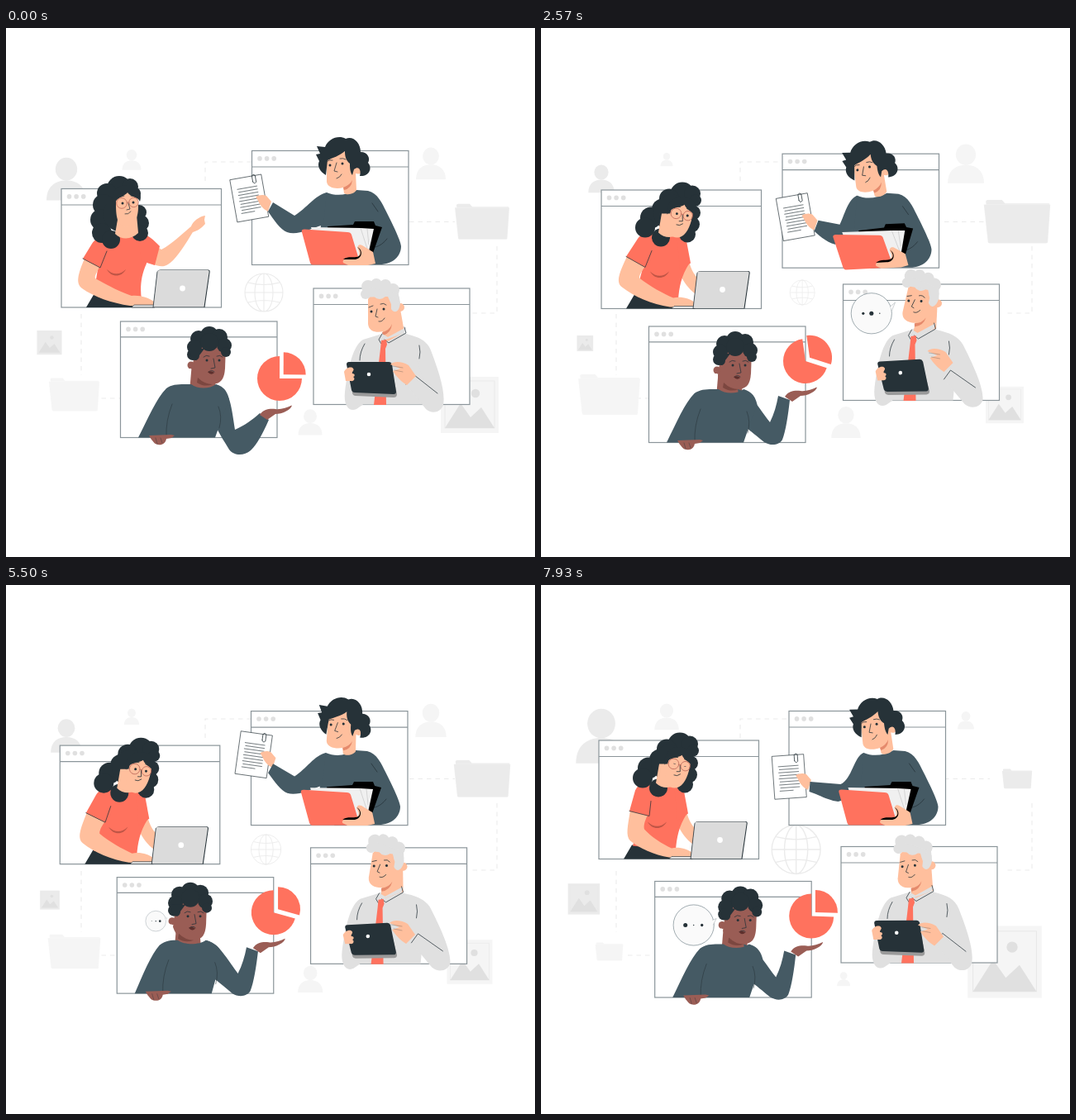
An HTML page that plays this animation: 640x640 px, repeating every 8 s.

```html
<!DOCTYPE html>
<html lang="en">
<head>
<meta charset="utf-8">
<title>Video meeting</title>
<style>
html,body{margin:0;width:100%;height:100%;overflow:hidden;background:#fff}
svg{display:block;width:100%;height:100%}
.line{fill:none;stroke:#263238;stroke-width:.75;stroke-linecap:round;stroke-linejoin:round}
.win{fill:#fff;stroke:#8b959a;stroke-width:1.2}
.dark{fill:#263238}.blue{fill:#455a64}.coral{fill:#ff725e}.skin{fill:#ffbf9d}.brown{fill:#9a5d55}
.grey{fill:#e0e0e0}.pale{fill:#f5f5f5}.mid{fill:#ebebeb}.thin{fill:none;stroke:#ebebeb;stroke-width:1.1}
</style>
</head>
<body>
<svg id="stage" viewBox="0 0 640 640"></svg>
<script>
const LOOP = 8000;
const T = [0, 1210, 2570, 3430, 4640, 6430, 7930];

// Monotone cubic interpolation through (times, values).
function track(values, times = T) {
  const n = values.length;
  const slope = i => (values[i + 1] - values[i]) / (times[i + 1] - times[i]);
  const tangent = i => {
    if (i === 0) return slope(0);
    if (i === n - 1) return slope(n - 2);
    const a = slope(i - 1), b = slope(i);
    return a * b <= 0 ? 0 : 2 * a * b / (a + b);
  };
  const m = values.map((_, i) => tangent(i));
  return t => {
    if (t <= times[0]) return values[0];
    if (t >= times[n - 1]) return values[n - 1];
    let i = 0;
    while (t > times[i + 1]) i++;
    const h = times[i + 1] - times[i], s = (t - times[i]) / h, r = 1 - s;
    return values[i] * (1 + 2 * s) * r * r + m[i] * h * s * r * r
      + values[i + 1] * s * s * (3 - 2 * s) - m[i + 1] * h * s * s * r;
  };
}

// Blends two paths of equal structure.
function mix(a, b, u) {
  const nums = b.match(/-?[\d.]+/g);
  let i = 0;
  return a.replace(/-?[\d.]+/g, v => (+v + (nums[i++] - v) * u).toFixed(2));
}

const path = (d, cls, extra = '') => `<path class="${cls}" d="${d}" ${extra}/>`;
const dot = (x, y, r, cls, extra = '') => `<circle class="${cls}" cx="${x}" cy="${y}" r="${r}" ${extra}/>`;
const slot = (id, cls) => `<path id="${id}" class="${cls}"/>`;
const group = (id, body) => `<g id="${id}">${body}</g>`;
const blobs = (list, cls) => list.map(([x, y, r]) => dot(x, y, r, cls)).join('');
const eyes = (id, ...pts) => group(id, blobs(pts.map(p => [...p, 1.5]), 'dark'));

const browser = (x, y, w, h, bar) =>
  `<rect class="win" x="${x}" y="${y}" width="${w}" height="${h}"/>` +
  path(`M${x} ${y + bar}h${w}`, 'win') +
  [0, 1, 2].map(i => dot(x + 9.5 + i * 8.6, y + 9.4, 2.8, 'grey')).join('');

const person = (size, cls) => `<g class="${cls}" transform="scale(${size})">
  <ellipse cy="-.47" rx=".55" ry=".58"/><path d="M-1 1.1C-1 .42-.58.1 0 .1S1 .42 1 1.1Z"/></g>`;
const folder = (size, cls) => `<g transform="scale(${size})">` +
  path('M-31-20Q-31-21.5-29-21.5H-15L-12-18H32V-10H-30Z', cls) +
  path('M-33-17H33L30.5 20Q30.5 21.5 29 21.5H-27Q-29 21.5-29 20Z', cls, 'stroke="#fff" stroke-opacity=".3" stroke-width=".6"') + '</g>';
const picture = (size, cls) => `<g transform="scale(${size})">
  <rect class="${cls}" x="-35" y="-34" width="70" height="68"/>
  <rect x="-30" y="-29" width="60" height="57" fill="none" stroke="#e6e6e6" stroke-width=".7"/>` +
  path('M-30 28L-11-2L1 15L14 3L30 28Z', 'grey') + dot(7, -14, 5.2, 'grey') + '</g>';
const globe = path('M-23 0A23 23 0 1 1 23 0A23 23 0 1 1-23 0ZM-11 0A11 23 0 1 1 11 0A11 23 0 1 1-11 0ZM0-23V23M-23 0H23M-19-12Q0-7 19-12M-19 12Q0 7 19 12', 'thin');

const bubble = (id, x, y, tail) => `<g id="${id}">` +
  dot(x, y, 24.6, '', 'fill="#fafafa" stroke="#455a64" stroke-width=".5"') +
  path(tail, '', 'fill="#fafafa" stroke="#8b959a" stroke-width=".4"') +
  [-1, 0, 1].map(i => dot(x + i * 10, y, 1, 'dark')).join('') + '</g>';

// Two or three poses for each flexible shape.
const pose = {
  torso: ['M130 249C142 256 152 254 160 248L172 252L170 285C163 300 162 315 164 328L106 322L112 286L108 258Z',
          'M134 245C146 252 156 250 162 245L168 250L173 284C164 298 161 312 160 328L108 322L118 286L113 252Z'],
  sleeveL: ['M132 249C118 250 108 254 104 261L93 279L114 290L122 270Z',
            'M134 245C120 245 114 248 110 255L97 275L120 288L128 268Z',
            'M134 245C120 245 115 247 111 255L104 280L128 286L130 268Z'],
  hem: ['M93 279L114 290L122 270', 'M97 275L120 288L128 268', 'M104 280L128 286L130 268'],
  armL: ['M95 279L113 289C110 296 107 299 108 303C124 312 140 320 152 324C162 323 172 326 179 331L178 336L150 336C128 333 106 325 92 315C84 309 87 298 95 279Z',
         'M98 275L120 287C115 294 113 297 113 301C126 311 142 320 154 325C164 323 174 326 181 331L180 336L150 336C128 333 106 323 92 312C84 306 89 294 98 275Z',
         'M105 279L126 285C122 293 121 298 122 302C130 311 144 320 155 325C164 323 174 326 181 331L180 336L152 336C134 333 116 325 105 316C99 310 102 298 105 279Z'],
  sleeveR: ['M158 248C172 249 178 256 186 264L180 287L164 282Z',
            'M158 247C166 247 168 250 170 256L175 283L162 291Z'],
  armR: ['M178 262L188 268C200 262 212 250 224 240C226 234 234 228 241 227L240 232L241 237C236 243 230 246 226 247C218 260 206 280 196 286C190 290 184 288 178 286Z',
         'M160 284L172 278C176 292 180 300 190 306C194 308 196 310 198 312L198 318L196 322C192 326 188 324 184 322C176 318 168 308 164 300C162 296 160 292 160 288Z'],
  reach: ['M388 199C374 202 364 218 349 227L323 211L317 222C324 232 332 244 340 247C352 251 366 244 384 238Z',
          'M388 199C377 203 373 222 367 234L341 229L336 242C344 249 352 256 361 258C368 258 374 252 384 244Z',
          'M388 199C376 203 374 231 360 237L323 234L322 246C334 250 346 257 357 258C366 256 374 250 384 242Z'],
  jumper: ['M224 431C232 437 246 437 254 431C264 434 268 440 270 450L262 470L253 495.5L160 495.5C172 472 182 448 194 436C202 430 212 431 224 431Z',
           'M212 431C220 437 238 437 246 431C256 434 262 438 266 448L260 470L253 495.5L160 495.5C170 472 180 448 190 437C198 431 204 431 212 431Z'],
  lift: ['M254 432C270 436 272 452 277 486C290 480 298 474 307 466L318 474C310 492 303 505 296 511C288 518 276 518 270 510C264 500 256 488 252 478Z',
         'M246 431C262 435 270 452 285 471C290 461 293 450 295 439L309 444C307 462 304 482 300 492C296 499 286 500 278 495C268 487 260 480 254 476Z'],
  shirtArm: ['M484 370C500 374 509 378 514 390C523 414 532 440 529 456C526 466 514 467 508 461L484 431L494 420L505 427L496 400Z',
             'M484 370C504 374 514 380 519 392C530 414 542 440 541 455C538 465 526 466 519 460L494 430L502 419L508 424L500 400Z']
};

// Hair curls: x, y upright, then x, y leaning, then radius.
const curls = [[137,194,165,200,15],[122,200,149,205,12],[150,192,177,199,10],[156,200,181,207,7],
  [118,214,141,218,13],[115,232,127,228,13],[116,248,120,240,12],[127,256,139,252,11],
  [161,223,178,222,9],[163,236,176,236,10],[162,248,171,248,10],[140,225,152,222,22]];

const woman = browser(67, 194.5, 193.5, 143.5, 19.5) +
  slot('armR', 'skin') + path('M107 321C120 322 140 328 158 331L152 338H97Z', 'dark') +
  slot('torso', 'coral') + slot('sleeveR', 'coral') +
  group('bust', path('M122 292C129 299 138 299 145 292C140 302 127 302 122 292Z', '', 'fill="#bf5546"')) +
  slot('armL', 'skin') + slot('sleeveL', 'coral') + slot('hem', 'line') +
  group('womanHair', curls.map(c => dot(c[0], c[1], c[4], 'dark')).join('')) +
  group('womanNeck', path('M136 226L132 249C140 257 152 256 160 248L158 226Z', 'skin')) +
  group('womanHead',
    path('M133 203C133 220 132 238 143 240C155 242 160 230 160 216L159 198L146 195Z', 'skin') +
    path('M130 216C132 205 143 204 147 199C151 205 160 204 162 210C166 199 157 189 146 190C130 190 125 205 130 216Z', 'dark') +
    '<g fill="none" stroke="#bd6b5c" stroke-width=".8"><circle cx="140" cy="212" r="6.3"/><circle cx="154.5" cy="211" r="5.7"/><path d="M146 211h3"/></g>' +
    eyes('womanEyes', [141, 212], [154, 211]) +
    path('M136 205L143 203M151 203L157 204M148 212L150 219L146 220M144 225Q148 226 151 222', 'line')) +
  path('M152 338L155 335H180V338Z', 'grey', 'stroke="#263238" stroke-width=".6"') +
  path('M187 292.5H245Q247 292.5 246.7 295L240.5 338H178L183 295Q183.5 292.5 187 292.5Z', 'dark') +
  path('M186 293H244Q246 293 245.7 295L239.5 337.5H178L183 295Q183.5 293 186 293Z', '', 'fill="#dbdbdb"') +
  path('M183 295L178 338', 'line') + dot(213.5, 315, 3.4, '', 'fill="#fff"');

const presenter = browser(297.5, 148.5, 189.5, 138, 19.5) +
  path('M388 199C400 204 412 202 424 196L438 197C450 200 455 212 460 222C468 238 477 256 478 264C478 276 468 286 452 286H410L380 250L384 202Z', 'blue') +
  path('M443 212L450 222M461 255Q455 263 447 265', 'line') +
  group('sheet',
    '<rect x="-19" y="-26" width="38.5" height="52" fill="#fff" stroke="#263238" stroke-width=".65"/>' +
    '<g opacity=".8">' + Array.from({ length: 9 }, (_, i) => path(`M${-12 + i % 2} ${-13 + i * 3.7}H${i === 8 ? 4 : 12}`, 'line')).join('') + '</g>' +
    path('M8-19V-26Q10-29 12-26V-18Q9-15 8-19', 'line')) +
  group('sheetHand', path('M8-2C12-4 17-5 21-3L27 4L23 16C17 13 13 8 11 3Z', 'skin')) +
  slot('reach', 'blue') +
  group('files',
    path('M389 240L420 238L422 234H445L447 239L455 241L443 275L434 286H398Z', '', 'fill="#000"') +
    path('M369 241L429 242L445 243L439 270L428 284H382Z', '', 'fill="#f0f0f0"') +
    path('M429 242L438 270M437 243L439 262', '', 'fill="none" stroke="#c8c8c8" stroke-width=".7"') +
    path('M361 243.5L413 247Q417 247 418 250L429 286.5H371Q369 286.5 368 284L358 247Q357 243.5 361 243.5Z', 'coral') +
    path('M408 284C406 280 412 278 421 278C427 277 429 274 426 268C424 264 427 261 431 263L444 271L447 285L438 287H414Z', 'skin') +
    path('M408 280C414 275 421 279 427 276C431 273 428 267 425 265C433 269 431 280 421 280Z', '', 'fill="#000"')) +
  group('manHead',
    path('M388 152L388 186C389 194 400 195 408 193L409 200C414 203 422 200 424 196L423 174L420 148Z', 'skin') +
    dot(426, 171, 5.5, 'skin') + path('M408 193Q416 190 419 184Q418 194 409 196Z', '', 'fill="#e58a6c"') +
    path('M389 160L387 178C380 174 376 167 379 161L375 153L380 152L376 143L386 144C390 134 402 129 411 134C420 130 429 139 429 150C438 150 441 158 438 163C444 170 439 180 428 179C430 172 427 166 421 171L419 178C416 174 416 168 416 164C411 160 410 155 410 149C403 155 395 157 389 160Z', 'dark') +
    eyes('manEyes', [392, 166], [407, 164]) +
    path('M389 161Q391 159 395 160M404 158Q408 157 411 159M400 163L397 173L401 174M400 182Q404 181 406 177', 'line'));

const speaker = browser(138.5, 355, 189.5, 140.5, 18.8) +
  group('speakerNeck', path('M225 405L222 440H254L252 415Z', 'brown')) +
  slot('lift', 'blue') + slot('jumper', 'blue') +
  path('M201 455Q193 475 194 495M257 458Q262 470 258 484', 'line', 'opacity=".7"') +
  path('M173 493L200 492L204 493L200 496L194 497C193 503 188 505 184 504C180 504 178 500 176 498Z', 'brown') +
  path('M181 496L183 503M187 496L189 502', 'line', 'opacity=".5"') +
  group('palm', path('M307 468C311 461 320 460 326 461C332 462 340 459 346 456.5C345 462 334 467 326 467L316 474Z', 'brown')) +
  slot('pie', 'coral') + slot('slice', 'coral') +
  group('speakerHead',
    path('M228 392L225 415C229 428 238 432 250 431C261 430 264 424 265 412L266 384L240 380Z', 'brown') +
    path('M232 423Q240 431 250 431Q240 435 231 429Z', '', 'fill="#7c4740"') +
    blobs([[246,372,11],[233,376,10],[258,374,10],[264,384,9],[266,392,6],[228,386,9],[226,395,7],[246,380,11]], 'dark') +
    path('M224 398C228 405 234 402 234 396L240 388H222Z', 'dark') + dot(224, 408, 4.5, 'brown') +
    dot(223, 413, 1.1, '', 'fill="#fff"') +
    eyes('speakerEyes', [243, 402], [258, 402]) +
    path('M239 398Q242 395 246 397M255 397Q259 395 262 398M251 400L253 411L248 412M245 416Q249 413 252 416', 'line') +
    path('M244 416Q248 421 252 417Q248 414 244 416Z', '', 'fill="#5c2f2c"')) +
  bubble('bubble2', 185.5, 408, 'M208 402L213 400L209 408');

const elder = browser(372, 315, 189, 140.5, 19.5) +
  path('M455 370L432 377C420 384 414 410 410 440C408 458 416 465 424 461L432 455.5H505L510 400L500 378L484 370L470 362Z', 'grey') +
  slot('shirtArm', 'grey') + slot('shirtCuff', 'line') +
  path('M434 382Q428 392 428 402M500 384Q502 392 500 400', 'line') +
  group('elderHead',
    path('M456 355L456 377L462 379L482 368L477 340Z', 'skin') +
    path('M438 328L438 358C439 368 449 369 457 367C468 364 477 350 476 338L470 322L444 320Z', 'skin') +
    dot(477, 338, 5, 'skin') + path('M455 368Q464 366 467 358Q466 369 456 372Z', '', 'fill="#e58a6c"') +
    path('M466 326L466 340C470 346 476 344 477 332L474 318Z', 'grey') +
    blobs([[438,313,8],[448,310,7],[459,311,7],[468,317,8],[435,322,6],[470,328,6],[452,319,9]], 'grey') +
    path('M433 326Q448 325 462 325L466 334L470 320L440 314Z', 'grey') +
    eyes('elderEyes', [442, 343], [457, 340]) +
    path('M439 338L444 336M453 334Q457 332 460 335M449 340L447 349L450 350M451 355Q455 356 458 351', 'line')) +
  path('M455 370L451 378L454 383L459 377L482 369L484 362L462 374Z', 'grey') +
  path('M482 362L484 369L463 381L458 377M455 370L451 377L454 382', 'line') +
  path('M454 378L460 377L461 383L459 388L460 456H445L453 388Z', 'coral') +
  group('tablet',
    path('M416 409H466L473 443Q473 447 469 447L423 445Q420 445 419 442Z', '', 'fill="#9a9a9a"') +
    path('M415 404H463Q466 404 467 407L472 440Q472 443 469 443L422 441Q419 441 418 438L412 407Q412 404 415 404Z', 'dark') +
    dot(439, 419, 2.3, '', 'fill="#fff"') +
    path('M409 416C411 411 418 409 420 412C422 414 418 416 419 418C423 418 422 422 420 422C423 424 421 428 417 427L411 427Z', 'skin')) +
  group('elderHand', path('M465 407C470 402 480 404 487 408L496 421L485 432C478 428 472 421 468 415L477 412Z', 'skin') +
    path('M467 409L480 411M470 414L480 416', 'line', 'opacity=".35"')) +
  bubble('bubble1', 406.3, 350.3, 'M429 342L435 337L431 347');

document.getElementById('stage').innerHTML =
  path('M241 185V162H297M488 234.5H543M594 264V345H562M91 346V420M105 448H138', 'thin', 'stroke-dasharray="5.5 5"') +
  group('shrink0', person(24, 'mid')) + group('shrink1', person(11.5, 'pale')) +
  group('shrink2', `<g transform="translate(-12 0)">${globe}</g>`) +
  group('shrink3', `<g transform="translate(-2.3 -2.6)">${picture(.43, 'mid')}</g>`) +
  group('shrink4', picture(1, 'pale')) +
  group('grow0', person(18, 'pale')) + group('grow1', `<g transform="translate(4.2 0)">${person(14.5, 'pale')}</g>`) +
  group('grow2', folder(1, 'mid')) + group('grow3', folder(.93, 'pale')) +
  group('woman', woman) + group('presenter', presenter) + group('speaker', speaker) + group('elder', elder);

const el = {};
document.querySelectorAll('[id]').forEach(node => el[node.id] = node);
const move = (id, value) => el[id].setAttribute('transform', value);
const draw = (id, d) => el[id].setAttribute('d', d);

const shrinkAt = [[73, 182], [152, 159], [324, 320], [54.8, 383.2], [561, 456]];
const growAt = [[514, 163.5], [363.8, 476.5], [576, 234.3], [82.5, 443.5]];
const shrink = track([1, .87, .655, .565, .61, 1.04, 1.28]);
const grow = track([1, 1.06, 1.22, 1.28, 1.22, .79, .55]);
const drift = {
  woman: [track([0, 3, 6, 3, -2, -1, 3]), track([0, 1, 1.5, 3, 2, -3.5, -6.5])],
  presenter: [track([0, -3, -5.5, -7, -4, 1.5, 2.5]), track([0, 1.5, 3.7, 5.5, 5.5, 2.5, 4])],
  speaker: [track([0, -3.7, -8, -8, -6.5, -2, -.8]), track([0, 4.5, 6, 3, -1.5, -1, 3.5])],
  elder: [track([0, -3, -6.5, -4, -2, -6, -9]), track([0, -3.5, -5, -2, 2.5, 3, 1.5])]
};
const lean = track([0, .92, 1, 1, 1, 1, 1]);
const tuck = track([0, 0, 0, 0, 0, .6, 1]);
const manTilt = track([0, -5, -7, -2, 6, 0, -6]);
const lower = track([0, .75, 1, 1, .2, 0, 0]);
const extend = track([0, 0, 0, 0, 0, 0, 1]);
const sheetX = track([294, 307, 313, 314, 306, 297, 297.5]);
const sheetY = track([206, 222.5, 225, 225, 202.5, 200.5, 228]);
const sheetTurn = track([-10, -12, -10, -10, 8, 8, -4]);
const headShift = track([0, 0, -3, -12, -18, -19, -4]);
const sway = track([0, 0, .1, 1, 1, 1, .2]);
const raise = track([0, .74, 1, 1, .96, 1, 1]);
const pieTurn = track([0, 275, 352, 360, 360, 360, 360]);
const pieSweep = track([90, 90, 116, 109, 109, 100, 92]);
const elderTilt = track([0, 13, 13, 10.5, 8, 11, 6]);
const elbow = track([0, .9, 1, 1, 1, .95, .1]);
const handX = track([0, 4, 9, 9, 3, 2, 0]);
const handY = track([0, -6, -11, -11, -2, 0, 3]);
const pop1 = track([0, 1, 1, 0], [500, 800, 5000, 5250]);
const pop2 = track([0, 1], [5350, 5650]);

function wedge(x, y, from, sweep, r = 27) {
  const at = a => {
    const k = a * Math.PI / 180;
    return `${x + r * Math.sin(k)} ${y - r * Math.cos(k)}`;
  };
  return `M${x} ${y}L${at(from)}A${r} ${r} 0 ${sweep > 180 ? 1 : 0} 1 ${at(from + sweep)}Z`;
}

function blink(id, cy, t, when) {
  const open = Math.min(1, Math.max(.2, Math.abs(t - when) / 110));
  move(id, `translate(0 ${cy * (1 - open)}) scale(1 ${open})`);
}

function talk(id, x, y, size, peak) {
  move(id, `translate(${x} ${y}) scale(${size}) translate(${-x} ${-y})`);
  [...el[id].querySelectorAll('.dark')].forEach((node, i) => {
    const gap = Math.abs(((peak - i - 1) % 3 + 4.5) % 3 - 1.5);
    node.setAttribute('r', .7 + 1.9 * Math.max(0, Math.cos(gap * 1.35)));
  });
}

function render(t) {
  shrinkAt.forEach(([x, y], i) => move('shrink' + i, `translate(${x} ${y}) scale(${shrink(t)})`));
  growAt.forEach(([x, y], i) => move('grow' + i, `translate(${x} ${y}) scale(${grow(t)})`));
  for (const id in drift) move(id, `translate(${drift[id][0](t)} ${drift[id][1](t)})`);

  const u = lean(t), v = tuck(t);
  for (const id of ['torso', 'sleeveR', 'armR']) draw(id, mix(...pose[id], u));
  for (const id of ['sleeveL', 'armL', 'hem']) draw(id, mix(mix(pose[id][0], pose[id][1], u), pose[id][2], v));
  curls.forEach(([x, y, x2, y2], i) => {
    el.womanHair.children[i].setAttribute('cx', x + (x2 - x) * u);
    el.womanHair.children[i].setAttribute('cy', y + (y2 - y) * u);
  });
  move('womanHead', `translate(${10 * u} ${11.5 * u}) rotate(${15 * u} 146 240)`);
  move('womanNeck', `translate(${4 * u} ${-3 * u})`);
  move('bust', `translate(${4 * u} ${u})`);

  const px = sheetX(t), py = sheetY(t), low = lower(t);
  move('sheet', `translate(${px} ${py}) rotate(${sheetTurn(t)})`);
  move('sheetHand', `translate(${px} ${py})`);
  draw('reach', mix(mix(pose.reach[0], pose.reach[1], low), pose.reach[2], extend(t)));
  move('files', `translate(${2 * low} ${low}) rotate(${-3 * low} 395 265)`);
  move('manHead', `rotate(${manTilt(t)} 408 197)`);

  const up = raise(t), turn = pieTurn(t), sweep = pieSweep(t), s = sway(t), shift = headShift(t);
  const cx = 331 - 3 * up, cy = 424 - 27 * up, mid = (turn + sweep / 2) * Math.PI / 180;
  draw('jumper', mix(...pose.jumper, s));
  draw('lift', mix(...pose.lift, up));
  move('palm', `translate(${-4 * up} ${-28 * up})`);
  draw('pie', wedge(cx, cy, turn + sweep, 360 - sweep));
  draw('slice', wedge(cx + 6.6 * Math.sin(mid), cy - 6.6 * Math.cos(mid), turn, sweep));
  move('speakerHead', `translate(${shift} 0)`);
  move('speakerNeck', `translate(${(shift - 9 * s) / 2} 0)`);

  const e = elbow(t), tilt = elderTilt(t);
  draw('shirtArm', mix(...pose.shirtArm, e));
  draw('shirtCuff', mix('M484 431L494 420L522 442', 'M494 430L502 419L532 440', e));
  move('elderHead', `translate(${.15 * tilt} ${-.27 * tilt}) rotate(${tilt} 465 373)`);
  move('tablet', `translate(${2.5 * e} ${3 * e}) rotate(${-3 * e} 441 423)`);
  move('elderHand', `translate(${handX(t)} ${handY(t)})`);

  blink('manEyes', 165, t, 1210);
  blink('speakerEyes', 402, t, 3430);
  blink('womanEyes', 211.5, t, 7930);
  talk('bubble1', 406.3, 350.3, pop1(t), 2.7 + (t - 1210) * .001545);
  talk('bubble2', 185.5, 408, pop2(t), 1.4 + (t - 6430) * .00158);
}

function tick() {
  render(performance.now() % LOOP);
  requestAnimationFrame(tick);
}
tick();
</script>
</body>
</html>
```
